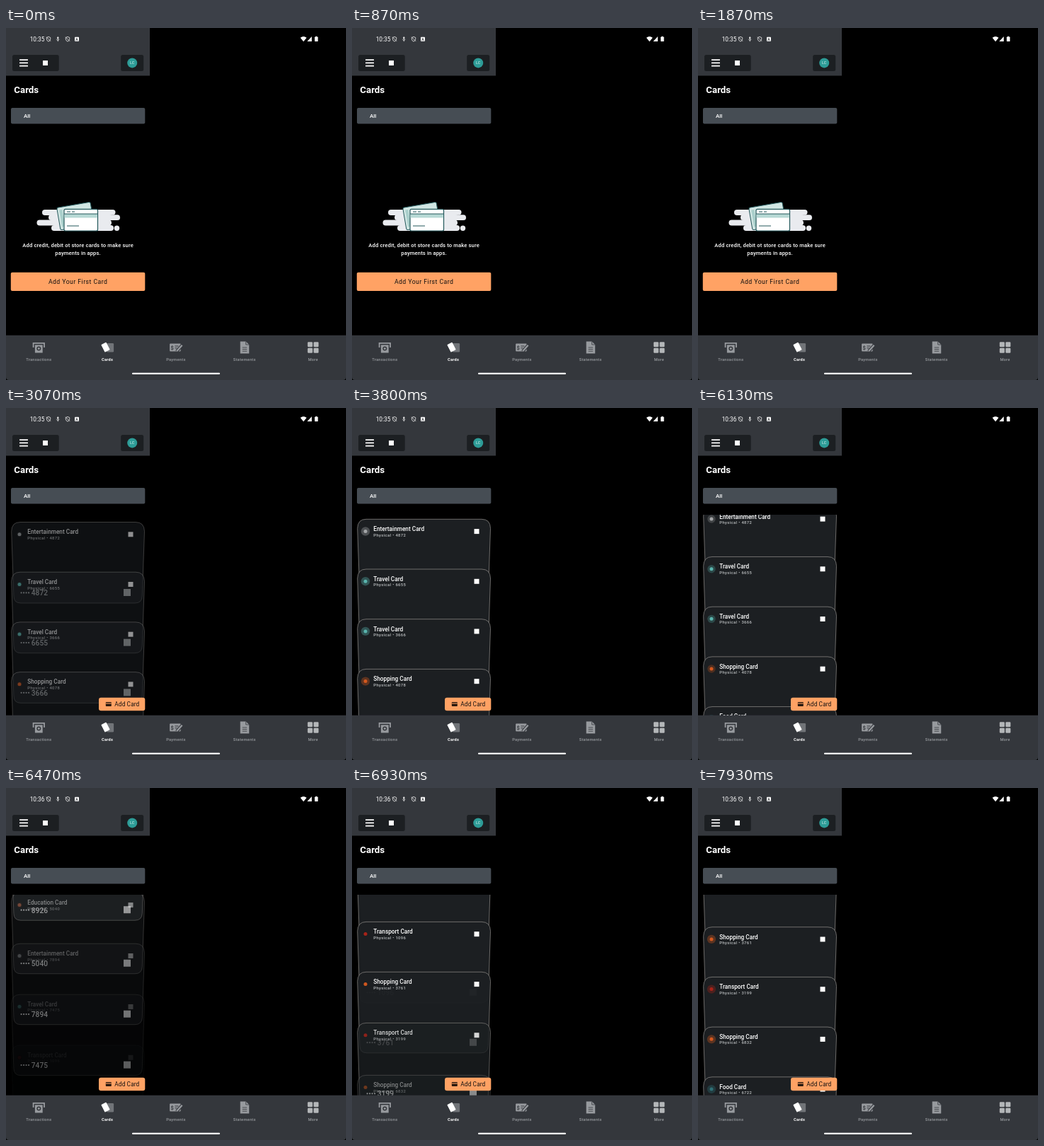
Animation, 480 px wide and 498 px high, one loop 8000 ms. Source, as an HTML page with a canvas:

```html
<!DOCTYPE html>
<html lang="en">
<head>
<meta charset="utf-8">
<title>Cards</title>
<style>
html, body { margin: 0; width: 100%; height: 100%; overflow: hidden; background: #000; }
canvas { display: block; width: 480px; height: 498px; }
</style>
</head>
<body>
<canvas id="stage"></canvas>
<script>
const W = 480, H = 498, LOOP = 8000;
const LIST_AT = 2700, CLOCK_AT = 5600, FLING_AT = 6120;
const PITCH = 70.7, CARD_H = 114.5, LIST_TOP = 151, LIST_BOTTOM = 435;
const PANEL = '#34373c', BOX = '#1c1f22', ORANGE = '#ffa264', GREY = '#979a9e';

const canvas = document.getElementById('stage');
const ctx = canvas.getContext('2d');
const scale = window.devicePixelRatio || 1;
canvas.width = W * scale;
canvas.height = H * scale;

const dotColor = {
  Entertainment: '#a4a6a8', Travel: '#5ab5ae', Shopping: '#d4591f',
  Transport: '#a82318', Education: '#d9734f', Food: '#2f7076'
};
const cards = [
  ['Entertainment', 4872], ['Travel', 6655], ['Travel', 3666], ['Shopping', 4078],
  ['Food', 8926], ['Education', 5040], ['Entertainment', 7894], ['Travel', 7475],
  ['Transport', 1096], ['Shopping', 3761], ['Transport', 3199], ['Shopping', 6832],
  ['Food', 6722]
];

// Fling: exponential slow-down that stops on a whole position
const REACH = 601.5, STOP = 597, DECAY = 372;
const scrollAt = t => t < FLING_AT ? 0 : Math.min(STOP, REACH * (1 - Math.exp((FLING_AT - t) / DECAY)));
const timeOfScroll = s => FLING_AT - DECAY * Math.log(1 - s / REACH);
const clamp = x => Math.max(0, Math.min(1, x));
const ease = x => (1 - Math.cos(Math.PI * clamp(x))) / 2;

function text(str, x, y, size, { weight = 400, color = '#fff', align = 'left', spacing = 0 } = {}) {
  ctx.font = `${weight} ${size}px Roboto, sans-serif`;
  ctx.letterSpacing = spacing + 'px';
  ctx.textAlign = align;
  ctx.fillStyle = color;
  ctx.fillText(str, x, y);
}

function rect(x, y, w, h, r, fill) {
  ctx.beginPath();
  ctx.roundRect(x, y, w, h, r);
  ctx.fillStyle = fill;
  ctx.fill();
}

function disc(x, y, r, fill) {
  ctx.beginPath();
  ctx.arc(x, y, r, 0, Math.PI * 2);
  ctx.fillStyle = fill;
  ctx.fill();
}

function path(d, fill, stroke, width = 1) {
  const p = new Path2D(d);
  if (fill) { ctx.fillStyle = fill; ctx.fill(p); }
  if (stroke) { ctx.strokeStyle = stroke; ctx.lineWidth = width; ctx.stroke(p); }
}

function at(x, y, draw, angle = 0) {
  ctx.save();
  ctx.translate(x, y);
  ctx.rotate(angle);
  draw();
  ctx.restore();
}

const square = (x, y, size, fill) => rect(x - size / 2, y - size / 2, size, size, 0, fill);

function statusBar(t) {
  text(t < CLOCK_AT ? '10:35' : '10:36', 33.7, 18.8, 8.3);
  for (const x of [60, 87]) at(x, 15.7, () => {
    path('M0 -3.3 L2.7 -2.2 V0 Q2.4 2.4 0 3.4 Q-2.4 2.4 -2.7 0 V-2.2 Z', null, '#ddd', .9);
    path('M-3 -3 L3 3', null, '#ddd', .9);
  });
  at(73.3, 15.7, () => {
    path('M0 -3.5 V3.4 M-2 .2 L0 2.2 L2 .2', null, '#ddd', .9);
    disc(0, -1.6, 1.3, '#ddd');
  });
  rect(97, 12.7, 6, 6, .7, '#fff');
  text('A', 100, 17.6, 5, { weight: 700, color: PANEL, align: 'center' });
  path('M415.6 13.8 Q420 10.2 424.4 13.8 L420 19.2 Z', '#fff');
  path('M431.7 12 V19 H425.2 Z', '#fff');
  rect(435.8, 12.6, 4.6, 6.5, .7, '#fff');
  rect(437, 11.8, 2.2, 1, 0, '#fff');
}

function header(t) {
  rect(0, 0, 203, 67.5, 0, PANEL);
  statusBar(t);
  rect(9, 38, 65.7, 23, 2.5, BOX);
  for (const y of [44.2, 48.5, 52.8]) rect(19, y, 12, 1.7, .3, '#fff');
  square(55.5, 49.5, 7, '#fff');
  rect(162.2, 38, 32, 23, 2.5, BOX);
  disc(178.2, 49.4, 7, '#2d9c97');
  text('LC', 178.2, 51.4, 5.4, { align: 'center', color: '#d9efed' });
  text('Cards', 11.3, 91.5, 13.3, { weight: 700 });
  rect(7, 113, 189.3, 22.4, 2, '#464d54');
  text('All', 25, 127.2, 8, { weight: 500 });
}

const navIcons = [
  c => {
    path('M-7.7 0 V-6.2 H7.7 V0', null, c, 1.8);
    path('M-5.4 -3.6 H5.4 V7.5 H-5.4 Z', c);
    disc(0, 1.6, 3, PANEL);
    disc(0, 1.6, 1.5, c);
  },
  () => {
    rect(-1, -6, 10, 12.5, 1.3, '#717478');
    at(-2.6, -.4, () => rect(-4, -6, 8, 12, 1, '#fff'), -.48);
  },
  c => {
    rect(-8.8, -5.6, 15.5, 11.2, 1, c);
    text('$', -5.2, 2.8, 7.5, { weight: 700, color: PANEL, align: 'center' });
    path('M-1.5 -2 H3.5 M-1.5 .8 H1.5', null, PANEL, 1);
    path('M1 5.5 L8.5 -3', null, PANEL, 4.4);
    path('M1.2 5.2 L8.7 -3.2', null, c, 2.3);
  },
  c => {
    path('M-6 -8.5 H2 L6.5 -4 V8.5 H-6 Z', c);
    path('M2 -8.5 V-4 H6.5 M-3 0 H3.5 M-3 2.6 H3.5 M-3 5.2 H3.5', null, PANEL, .8);
  },
  c => {
    for (const x of [-7.7, .8])
      for (const y of [-7.7, .8]) rect(x, y, 7, 7, 1.2, c);
  }
];

function nav() {
  rect(0, 434.7, W, H - 434.7, [0, 0, 4, 4], PANEL);
  ['Transactions', 'Cards', 'Payments', 'Statements', 'More'].forEach((label, i) => {
    const x = 46.3 + i * 96.8, active = i === 1;
    at(x, 452, () => navIcons[i](i === 4 ? '#b4b7b9' : GREY));
    text(label, x, 470.6, 5.7, {
      weight: active ? 700 : 500, color: active ? '#fff' : GREY, align: 'center', spacing: .25
    });
  });
  rect(178, 487.8, 124, 2.3, 1.1, '#fff');
}

function illustration() {
  const cloud = '#e9ebef', dark = '#23575a';
  const pills = [
    [51, 257, 40, 8], [60, 264, 90, 8], [43.5, 271.5, 60, 8], [64, 279, 88, 8],
    [110, 257, 44.5, 7.5], [120, 264.3, 41, 7.7], [115, 271.5, 34, 8]
  ];
  for (const [x, y, w, h] of pills) rect(x, y, w, h, h / 2, cloud);
  disc(156.5, 283.3, 3.7, cloud);
  at(98, 266, () => {
    rect(-24, -16, 48, 32, 2, '#d0e6e3');
    ctx.strokeStyle = dark;
    ctx.lineWidth = 1;
    ctx.stroke();
    rect(-21, -12, 4, 24, 0, '#a9cfcb');
  }, -.17);
  rect(82, 256.3, 47.5, 30.7, 2, '#fff');
  ctx.strokeStyle = dark;
  ctx.lineWidth = 1.2;
  ctx.stroke();
  rect(82.6, 263, 46.3, 5.5, 0, '#b7d9d5');
  path('M82 263 H129.5 M86 280 H103 M86 260 H91 M93 260 H97', null, dark, 1);
}

function emptyState() {
  illustration();
  const note = { weight: 500, align: 'center', spacing: .12 };
  text('Add credit, debit ot store cards to make sure', 101.6, 309.7, 7.65, note);
  text('payments in apps.', 101.6, 321, 7.65, note);
  rect(6.8, 345.7, 189.5, 26.2, 2, ORANGE);
  text('Add Your First Card', 101.6, 361.9, 8.7, { color: '#111', align: 'center', spacing: .45 });
}

function cardOutline(y) {
  const b = y + CARD_H;
  return `M7.7 ${y + 13} Q8 ${y} 20 ${y} H183 Q195.2 ${y} 195.5 ${y + 13}`
    + ` L192.3 ${b - 10} Q192 ${b} 182 ${b} H21 Q11 ${b} 10.9 ${b - 10} Z`;
}

function drawCard(i, t, scroll) {
  const [kind, number] = cards[i];
  const baseTop = 157.3 + PITCH * i;
  const bornScroll = baseTop - LIST_BOTTOM - PITCH;
  const born = bornScroll <= 0 ? LIST_AT : timeOfScroll(bornScroll);
  const alpha = ease((t - born - 100) / 520);
  const y = baseTop - scroll + 9 * (1 - alpha);
  if (alpha <= 0 || y > LIST_BOTTOM || y + CARD_H < LIST_TOP) return;

  ctx.globalAlpha = alpha;
  path(cardOutline(y), BOX, '#85827f', .8);

  const beat = Math.sin(Math.PI * (((t - 2800) / 2000 % 1 + 1) % 1));
  ctx.globalAlpha = alpha * .36 * beat * beat;
  disc(19, y + 17.2, 2.5 + 3.7 * beat, dotColor[kind]);
  ctx.globalAlpha = alpha;
  disc(19, y + 17.2, 2.5, dotColor[kind]);

  text(kind + ' Card', 30.3, y + 16.8, 8.25, { weight: 500 });
  text('Physical • ' + number, 30.3, y + 24.3, 5.9, { weight: 500, color: '#b9bcbe', spacing: .35 });
  square(176, y + 17.3, 7, '#fff');

  // The lower line of a card fades in ahead of the rest
  ctx.globalAlpha = Math.pow(alpha, .6);
  for (let k = 0; k < 4; k++) disc(21.6 + k * 3.5, y + CARD_H - 14.6, 1.1, '#fff');
  text(number, 35.8, y + CARD_H - 10.6, 10.2, { weight: 500 });
  square(171, y + CARD_H - 15, 10, '#fff');
  ctx.globalAlpha = 1;
}

function cardList(t) {
  const scroll = scrollAt(t);
  ctx.save();
  ctx.beginPath();
  ctx.rect(0, LIST_TOP, 203, LIST_BOTTOM - LIST_TOP);
  ctx.clip();
  cards.forEach((_, i) => drawCard(i, t, scroll));
  ctx.restore();

  rect(131, 409.7, 65.3, 18.5, 3, ORANGE);
  rect(140.8, 416, 8, 6, .7, '#2b1a10');
  rect(140.8, 417.4, 8, 1.1, 0, ORANGE);
  text('Add Card', 153.3, 422, 8.3, { color: '#111', spacing: .12 });
}

function draw(t) {
  ctx.setTransform(scale, 0, 0, scale, 0, 0);
  rect(0, 0, W, H, 0, '#000');
  header(t);
  if (t < LIST_AT) emptyState();
  else cardList(t);
  nav();
}

const start = performance.now();
function frame() {
  draw((performance.now() - start) % LOOP);
  requestAnimationFrame(frame);
}
frame();
</script>
</body>
</html>
```
